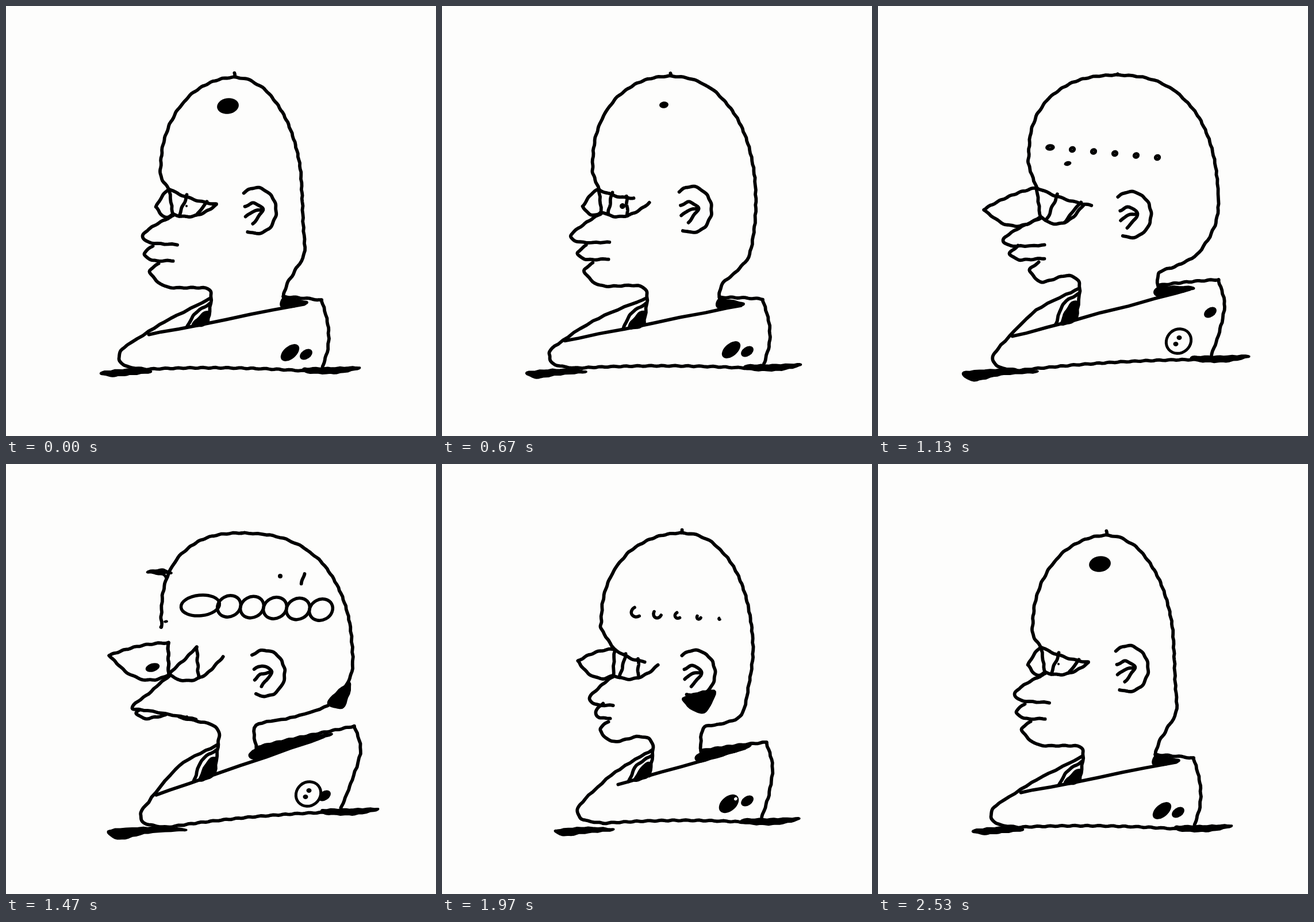
These frames come from a looping animation (748 by 748 pixels, 2560 ms). An HTML page with a canvas:

```html
<!DOCTYPE html>
<html lang="en">
<head>
<meta charset="utf-8">
<title>Morphing bust</title>
<style>
html, body { margin: 0; width: 100%; height: 100%; overflow: hidden; background: #fdfdfc; }
canvas { display: block; }
</style>
</head>
<body>
<canvas id="stage" width="748" height="748"></canvas>
<script>
const ctx = document.getElementById('stage').getContext('2d');
const PAPER = '#fdfdfc', INK = '#000';
const LOOP = 2560;
const KEYS = [0, 8, 20, 34, 44, 59, 76]; // key poses in 1/30 s ticks

// One anchor per key pose; every shape is derived from these
const tracks = {
  brow: '284,319 281,319 273,319 276,316 282,311 300,322',
  front: '269,281 266,280 262,275 262,262 270,266 277,272',
  top: '398,124 397,121 398,122 418,120 410,120 418,120',
  back: '515,330 525,350 546,340 592,350 603,350 541,330',
  nape: '519,430 523,420 533,437 555,432 560,420 521,436',
  neck: '487,488 487,488 486,486 489,464 435,455 454,460',
  neckBase: '482,510 482,514 482,511 487,490 436,497 450,503',
  collar: '549,512 552,513 558,510 592,476 606,456 564,484',
  foot: '551,627 552,627 560,622 580,607 583,598 556,615',
  hem: '197,612 190,610 187,610 200,614 234,612 236,605',
  edge: '248,572 232,577 213,583 233,575 262,575 307,558',
  throat: '357,508 357,509 357,508 351,491 369,488 367,497',
  jaw: '335,490 335,490 333,486 325,469 357,453 342,474',
  chin: '250,462 246,462 247,461 264,460 300,440 275,462',
  lip: '241,431 238,430 236,430 229,431 227,434 267,430',
  mouth: '290,443 287,441 289,440 289,439 278,437 292,442',
  nose: '237,400 234,400 224,400 217,407 219,424 257,407',
  nostril: '298,415 292,412 292,411 290,416 330,444 297,420',
  lensTip: '261,350 259,352 245,348 185,354 180,333 236,343',
  joint: '290,362 288,360 277,358 282,366 283,366 298,367',
  corner: '366,346 366,346 360,342 358,345 377,335 376,349',
  lash: '366,345 366,346 333,334 372,347 332,319 352,344',
  ear: '435,356 433,355 434,354 440,363 450,364 440,364',
  chain: '301,246 301,246 301,246 301,246 348,246 339,257',
  step: '37,3.5 37,3.5 37,3.5 37,3.5 40,1.5 36,3',
  link: '0,0 0,0 0,0 3.5,0 21,0 10,1', // size, openness
  speck: '330,274,0 330,274,0 330,274,0 330,274,5 278,274,3 278,274,0',
  spot: '19 19 8 0 0 0',
  pupil: '2 0 5 0 9 0',
  beak: '0 0 0 0 1 0',
  lobe: '0 0 0 0 0 1',
  button: '0 0 0 1 1 .15'
};
for (const name in tracks) tracks[name] = tracks[name].split(' ').map(s => s.split(',').map(Number));

// Monotone cubic interpolation through the looping poses
function sample(poses, tick) {
  let i = 0;
  while (i < 5 && tick >= KEYS[i + 1]) i++;
  const span = KEYS[i + 1] - KEYS[i], u = (tick - KEYS[i]) / span;
  const slope = (j, n) => {
    const k = (j + 6) % 6;
    return (poses[(k + 1) % 6][n] - poses[k][n]) / (KEYS[k + 1] - KEYS[k]);
  };
  const tangent = (j, n) => {
    const a = slope(j - 1, n), b = slope(j, n);
    return a * b <= 0 ? 0 : 2 * a * b / (a + b);
  };
  const u2 = u * u, u3 = u2 * u, h = 3 * u2 - 2 * u3;
  return poses[i].map((v, n) =>
    v * (1 - h) + poses[(i + 1) % 6][n] * h +
    span * ((u3 - 2 * u2 + u) * tangent(i, n) + (u3 - u2) * tangent(i + 1, n)));
}

const off = (p, x, y) => [p[0] + x, p[1] + y];
const mix = (a, b, t) => [a[0] + (b[0] - a[0]) * t, a[1] + (b[1] - a[1]) * t];
const bowAt = (a, b, sag, t) => off(mix(a, b, t), 0, 4 * sag * t * (1 - t));
const range = (n, f) => Array.from({ length: n }, (_, i) => f(i));
const bow = (a, b, sag) => range(9, i => bowAt(a, b, sag, i / 8));

// Smooth curve through the points with a slight hand tremor
function trace(pts, closed) {
  const n = pts.length;
  const at = i => pts[closed ? (i + n) % n : Math.max(0, Math.min(n - 1, i))];
  ctx.beginPath();
  for (let i = 0; i < (closed ? n : n - 1); i++) {
    const [a, b, d, e] = [at(i - 1), at(i), at(i + 1), at(i + 2)];
    for (let s = 0; s <= 8; s++) {
      const u = s / 8, u2 = u * u, u3 = u2 * u;
      const [x, y] = [0, 1].map(c => {
        const m0 = (d[c] - a[c]) * 0.45, m1 = (e[c] - b[c]) * 0.45;
        return b[c] + m0 * u + (3 * (d[c] - b[c]) - 2 * m0 - m1) * u2 + (2 * (b[c] - d[c]) + m0 + m1) * u3;
      });
      ctx.lineTo(x + 0.7 * Math.sin(y * 0.33 + x * 0.11), y + 0.7 * Math.sin(x * 0.29 - y * 0.13));
    }
  }
  if (closed) ctx.closePath();
}

function line(...pts) {
  trace(pts);
  ctx.lineWidth = 5.8;
  ctx.stroke();
}

function solid(...pts) {
  trace(pts, true);
  ctx.fill();
  ctx.lineWidth = 4;
  ctx.stroke();
}

function sprout(p, size, ...offsets) {
  if (size > 0.02) solid(...offsets.map(([x, y]) => off(p, x * size, y * size)));
}

function dot([x, y], rx, ry, rot = 0, color = INK) {
  ctx.fillStyle = color;
  ctx.beginPath();
  ctx.ellipse(x, y, Math.max(0, rx), Math.max(0, ry), rot, 0, 7);
  ctx.fill();
  ctx.fillStyle = INK;
}

function head({ brow, front, top, back, nape, neck, neckBase }, swell, beak) {
  const power = 2 / (2 + 0.4 * swell); // the skull gets squarer as it swells
  const quarter = (side, from, to) => range(8, i => {
    const a = (from + (to - from) * i / 7) * Math.PI / 2;
    return [top[0] + (side[0] - top[0]) * Math.max(0, Math.cos(a)) ** power,
            side[1] + (top[1] - side[1]) * Math.max(0, Math.sin(a)) ** power];
  });
  line(mix(brow, off(front, 0, 18), beak), off(front, 1, 17), ...quarter(front, 0, 1),
       ...quarter(back, 1, 0).slice(1), off(mix(back, nape, 0.5), 10 * swell, 0),
       nape, off(mix(nape, neck, 0.5), -2, 4), neck, neckBase);
  line(top, off(top, -1, -7 * (1 - swell)));
  sprout(nape, beak, [2, -9], [38, -38], [28, 0], [11, 3]);
  sprout([288, 188], beak, [-43, 0], [-18, -4], [0, 1], [-12, 2], [-10, 12], [-16, 4]);
}

function glasses({ brow, lensTip, joint, corner, lash, pupil }, swell, beak) {
  line(...bow(brow, lensTip, -5));
  line(...bow(lensTip, joint, 5 + 0.18 * (joint[0] - lensTip[0])));
  line(brow, joint);
  line(...bow(brow, mix(lash, joint, beak), 4 * (1 - beak)));
  const sag = 11 + 13 * swell;
  line(...bow(joint, corner, sag));
  const bar = (t, end) => line(...bow(mix(brow, lash, t + (1 - t) * beak), bowAt(joint, corner, sag, end), 0));
  bar(0.38, 0.14 * (1 - beak));
  bar(0.8, 0.55);
  const r = pupil[0];
  dot([314 - 59 * beak, 348 + 6 * beak], r * (1 + 0.4 * beak), r * (1 - 0.2 * beak), -0.3);
}

function profile({ joint, nose, nostril, lip, mouth, chin, jaw, throat }, beak, neckFoot) {
  const soft = 1 - beak, bridge = off(joint, 0, 3);
  line(bridge, off(mix(bridge, nose, 0.55), 0, -4 * soft), nose,
       off(mix(nose, nostril, 0.25), 0, 8 * soft), nostril);
  line(off(lip, 6 + 8 * soft, -6 - 8 * soft), lip, off(mix(lip, mouth, 0.25), 0, 8),
       off(mix(lip, mouth, 0.6), 0, 5), mouth);
  line(off(chin, 15, -14 * soft), chin, off(mix(chin, jaw, 0.25), 0, 16 * soft),
       off(mix(chin, jaw, 0.5), 0, 14 * soft), jaw, off(mix(jaw, throat, 0.5), 7, -6), throat, neckFoot);
}

function ear({ ear: c, lobe }) {
  line(...range(11, i => {
    const a = -2.25 + 4.25 * i / 10;
    return off(c, 35 * Math.cos(a), 40 * Math.sin(a));
  }));
  line(off(c, -19, -7), off(c, -4, -13), off(c, 12, -2), off(c, -6, 23));
  line(off(c, -18, 11), off(c, -7, 2), off(c, 11, -2));
  sprout(off(c, 0, 40), lobe[0], [-20, 4], [33, -9], [20, 24], [4, 27]);
}

function coat({ throat, hem, edge, collar, foot, neckBase }, swell, edgeEnd, edgeAt) {
  const heel = off(hem, 45, 20);
  line(off(throat, -2, 1), off(mix(throat, hem, 0.5), 0, -11 - 14 * swell), off(hem, 9, -18),
       hem, off(hem, 10, 14), heel);
  line(edge, edgeEnd);
  line(...bow(heel, off(foot, -28, 8), -4));
  line(...bow(off(neckBase, 0, -4), collar, -1));
  line(collar, off(collar, 11, 42), off(mix(collar, foot, 0.7), 10, 0), foot);
  solid(neckBase, off(edgeEnd, 2, -4), edgeEnd, off(neckBase, 1, 14));

  const x = throat[0];
  line(edgeAt(x - 42), off(throat, -29, 28), off(throat, -3, 10));
  solid(edgeAt(x - 32), off(throat, -18, 30), off(throat, -5, 24), edgeAt(x - 9));

  const left = hem[0] - 32 - 22 * swell, right = hem[0] + 56 + 24 * swell, mid = (left + right) / 2;
  solid([left, 638], [mid, 633], [right, 636], [mid, 641], [left + 18, 643 + 9 * swell]);
  solid(off(foot, -32, 4), off(foot, 15, 3), off(foot, 65, 2), off(foot, 25, 11), off(foot, -25, 10));
}

function marks({ top, foot, chain, step, link, speck, spot, button }, beak) {
  dot(off(top, -12, 50), spot[0], spot[0] * 0.72, -0.15);
  dot(speck, speck[2] * 1.3, speck[2] * 0.8, -0.2);
  dot([477, 195], 4 * beak, 4 * beak);
  if (beak > 0.02) line([517 + 2 * beak, 200 - 9 * beak], [517 - 3 * beak, 200 + 8 * beak]);

  const [size, open] = link;
  for (let i = 0; i < 6; i++) {
    const r = size * (1 - open * i / 5), wide = i ? 0 : 0.6 * (1 - open);
    if (r < 0.3) continue;
    const gap = 1.55 * open;
    ctx.beginPath();
    ctx.ellipse(chain[0] + step[0] * i - size * wide * 0.8, chain[1] + step[1] * i,
                r * (1 + wide), r * 0.85, wide ? -0.1 : -0.5 - 0.6 * open * (i % 2), gap, 2 * Math.PI - gap);
    ctx.lineWidth = Math.min(5.5, r * 2);
    ctx.stroke();
  }

  const b = button[0], stray = b - beak, patch = off(foot, -57, -24);
  dot(patch, 19 + 6 * b, 11 + 12 * b, -0.7);
  dot(off(patch, 28 + 27 * stray, 3 - 53 * stray), 12, 8, -0.6);
  dot(off(patch, 14 * (1 - b), -10 * (1 - b)), 20 * b, 18 * b, -0.7, PAPER);
  dot(off(patch, 1, -6), 4.5 * b, 4 * b);
  dot(off(patch, -5, 5), 4.5 * b, 4 * b);
}

function render() {
  const t = performance.now() % LOOP;
  const tick = Math.min(76, Math.floor((t + 3.4) * 0.03));
  const p = {};
  for (const name in tracks) p[name] = sample(tracks[name], tick);
  const swell = (p.back[0] - 515) / 88, beak = p.beak[0];
  const edgeEnd = off(p.collar, -31 - 22 * swell, 6 + 13 * swell);
  const edgeAt = x => mix(p.edge, edgeEnd, (x - p.edge[0]) / (edgeEnd[0] - p.edge[0]));

  ctx.fillStyle = PAPER;
  ctx.fillRect(0, 0, 748, 748);
  ctx.fillStyle = ctx.strokeStyle = INK;
  ctx.lineCap = ctx.lineJoin = 'round';
  head(p, swell, beak);
  glasses(p, swell, beak);
  profile(p, beak, edgeAt(p.throat[0] - 6));
  ear(p);
  coat(p, swell, edgeEnd, edgeAt);
  marks(p, beak);
  requestAnimationFrame(render);
}
render();
</script>
</body>
</html>
```
